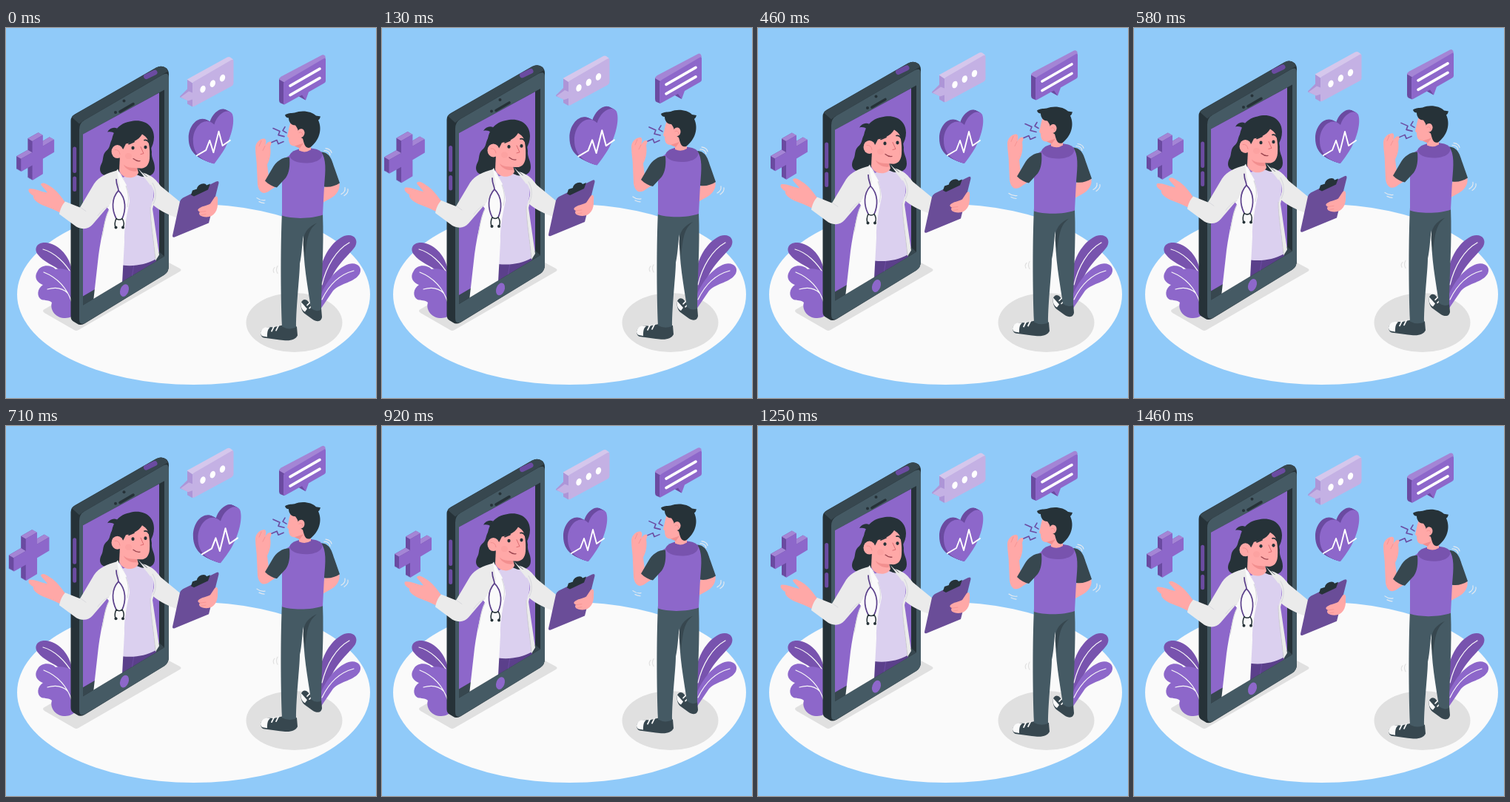
These frames come from a looping animation (500 px wide and 500 px high, 1.5 s). An HTML page with a canvas:

```html
<!DOCTYPE html>
<html lang="en">
<head>
<meta charset="utf-8">
<title>Online doctor</title>
<style>
html, body { margin: 0; width: 100%; height: 100%; overflow: hidden; background: #90caf9; }
canvas { display: block; width: 100vw; height: 100vh; }
</style>
</head>
<body>
<canvas id="stage"></canvas>
<script>
const canvas = document.getElementById('stage');
const ctx = canvas.getContext('2d');
const LOOP = 1500, STEPS = 36, LEAD = 30;
const C = {
  sky: '#90caf9', floor: '#fafafa', shade: '#e0e0e0', white: '#fafafa',
  sleeve: '#ebebeb', fold: '#d9d9de',
  ink: '#263238', slate: '#37474f', steel: '#455a64', skin: '#ffa8a7', blush: '#f28f8f',
  light: '#a485d5', purple: '#8d67ca', leaf: '#7853ae', deep: '#6b4ba1', dark: '#5b408b',
  board: '#6a4d98', lilac: '#dbd0ef'
};

const paths = new Map();
function path(d) {
  if (!paths.has(d)) paths.set(d, new Path2D(d));
  return paths.get(d);
}
function fill(color, d) {
  ctx.fillStyle = color;
  ctx.fill(path(d));
}
function line(color, width, d) {
  ctx.strokeStyle = color;
  ctx.lineWidth = width;
  ctx.stroke(path(d));
}
function oval(color, x, y, rx, ry = rx, turn = 0) {
  ctx.fillStyle = color;
  ctx.beginPath();
  ctx.ellipse(x, y, rx, ry, turn, 0, Math.PI * 2);
  ctx.fill();
}
function extrude(dx, dy, front, tops = '') {
  for (let i = 8; i > 0; i--) {
    ctx.save();
    ctx.translate(dx * i / 8, dy * i / 8);
    fill(C.deep, front);
    ctx.restore();
  }
  fill(C.light, tops);
  fill(C.purple, front);
}
function within(d, draw) {
  ctx.save();
  ctx.clip(path(d));
  draw();
  ctx.restore();
}
function shifted(dy, ...parts) {
  ctx.save();
  ctx.translate(0, dy);
  parts.forEach(part => part());
  ctx.restore();
}

function drawGround() {
  ctx.fillStyle = C.sky;
  ctx.fillRect(0, 0, 500, 500);
  oval(C.floor, 253.5, 360, 238.5, 122);
  oval(C.shade, 389.5, 398, 65, 40);
  fill(C.shade, 'M52 380L190 301L235 325Q238 327 235 329L98 408Q95 410 92 408L52 385Q48 382 52 380Z');
}

function drawPlants() {
  fill(C.leaf, 'M89 326C84 305 70 292 54 290C42 289 37 298 43 306C51 317 65 320 76 330C82 336 86 342 89 350Z');
  line(C.white, 1.2, 'M50 299C65 303 80 317 89 333');
  fill(C.purple, 'M90 330C82 326 73 324 67 326C60 319 47 320 43 328C37 337 42 344 50 347C42 352 41 363 48 367C53 369 58 367 62 371C59 380 66 391 78 392C84 392 89 391 94 386Z');
  line(C.white, 1.2, 'M51 330C66 336 81 347 89 371M56 353C66 350 76 351 83 358');
  fill(C.leaf, 'M426 322C431 303 443 287 457 281C469 277 477 285 472 295C464 307 447 318 437 344L426 364Z');
  line(C.white, 1.2, 'M427 347C433 322 446 300 464 290');
  fill(C.purple, 'M425 362C431 346 445 325 463 319C475 316 482 324 478 332C471 344 453 344 442 355L425 380Z');
  line(C.white, 1.2, 'M427 367C437 346 451 333 470 328');
}

function drawPhone() {
  fill(C.ink, 'M87.5 126Q87.5 120 93 117L203 54Q211 50 217 55Q220 58 220 63L220 322Q220 330 214 334L106 400Q100 403 96 400L91 397Q87.5 395 87.5 390Z');
  fill(C.slate, 'M89 121Q90 119 94 117L203 54Q210 50 217 55L219 59L104 126L99 130Z');
  fill(C.steel, 'M99 138Q99 129 106 125L211 64Q220 59 220 68L220 322Q220 330 214 334L107 399Q99 403 99 394Z');
  line(C.deep, 7, 'M189.5 66L201 60.5');
  line(C.deep, 5, 'M92.7 163.5V194M92.7 203.5V219');
  line(C.ink, 3.6, 'M154 113.5L172 103');
  oval(C.ink, 159.5, 99, 2);
  oval(C.ink, 148, 114.5, 2);
  fill(C.ink, 'M104 144L214 84V309L104 375Z');
  fill(C.slate, 'M104 363L207 303L214 309L104 375Z');
  fill(C.purple, 'M104 144L207 88V303L104 363Z');
  oval(C.purple, 160, 355, 5.6, 8.7, .35);
}

function drawTorso() {
  fill(C.dark, 'M156 315L203 306V325L156 346Z');
  line(C.deep, 1, 'M173 320L170 338');
  fill(C.lilac, 'M156 203L180 195L198 207C203 221 196 240 196 258L202 313C189 320 174 323 157 321Z');
  fill(C.white, 'M150 191L135 199L120 222L139 246C134 258 129 280 125 308L118 370L157 345L160 290C159 270 164 250 167 235C166 220 161 209 156 199Z');
  line(C.fold, 1.1, 'M139 247C133 258 133 269 130 282M155 199C163 214 168 226 164 242');
  fill(C.sleeve, 'M178 194L199 203L204 221L198 245L207 307L202 315C200 290 195 260 195 245C200 230 204 222 194 210Z');
  line('#c9c9cf', .8, 'M195 243C195 264 200 290 202 313');
}

function drawArms() {
  fill(C.skin, 'M81 237C74 228 68 219 59 214C54 210 48 208 47 212C49 216 54 219 56 223C46 221 36 216 31 218C29 221 33 225 37 227C36 230 39 234 44 237C50 241 62 244 73 250Z');
  fill(C.sleeve, 'M150 193C136 197 126 201 119 211L100 243L80 235C76 239 73 246 72 252L95 269C103 273 111 273 117 266L141 238L154 215Z');
  line(C.fold, 1, 'M139 241C134 243 129 247 124 254M101 243L108 248');
  fill(C.sleeve, 'M185 196C198 200 203 206 209 214L237 237L231 257C219 253 205 246 197 238C202 228 203 216 196 206Z');
  line(C.fold, 1.2, 'M199 238C204 229 203 218 198 210');
}

function drawClipboard() {
  fill(C.board, 'M225 281L235 235Q236 232 239 230L284 208Q288 206 287.5 210L274 264L228 283Q224.5 284 225 281Z');
  fill(C.ink, 'M250 226L252 220L258 218C258 212 269 208 271 213L276 211L273 219L254 228Z');
  fill(C.skin, 'M260 245C264 241 271 241 276 238L282 229C285 226 287 229 286 235C287 247 281 256 271 256C263 256 259 252 262 249C259 248 259 246 260 245Z');
  line(C.blush, .7, 'M262 249L270 248M264 253L270 252');
}

function drawStethoscope() {
  line(C.dark, 1.7, 'M149 205C149 213 152 216 152 220C142 231 143 246 149 258M152 220C163 231 162 247 157 258');
  line(C.ink, 1.5, 'M149 258Q153 261 157 258M149 258Q146 264 148 270M157 258Q161 264 158 270');
  oval(C.ink, 148.5, 270, 2);
  oval(C.ink, 158, 270, 2);
}

function drawDoctorHead() {
  fill(C.ink, 'M145 148C139 156 142 162 135 167C130 172 132 179 129 184C123 196 132 202 140 199C146 201 152 198 155 191L180 200C188 204 201 201 201 190C201 180 196 177 197 168L193 140L160 134Z');
  fill(C.skin, 'M154 173L153 193C157 206 176 205 179 196L176 185Z');
  fill(C.blush, 'M159 185C164 190 171 190 177 188L177 194C169 195 161 191 159 185Z');
  fill(C.skin, 'M155 150L185 141C193 147 195 163 194 177C193 187 188 191 180 190C168 190 158 186 155 177Z');
  fill(C.ink, 'M144 162C140 147 149 130 167 127C186 122 200 132 200 148C200 154 198 160 195 165C195 155 191 148 184 144C179 153 168 156 162 157C160 161 158 165 156 168Z');
  fill(C.ink, 'M150 136C145 134 140 136 137 141C142 140 145 141 148 144Z');
  oval(C.skin, 150.5, 167.5, 8, 9);
  line(C.blush, 1, 'M147 165Q153 164 154 171');
  ctx.globalAlpha = .25;
  oval(C.blush, 165.5, 173.5, 4.5, 4);
  ctx.globalAlpha = 1;
  oval(C.ink, 171.5, 162.5, 2.1, 2.4);
  oval(C.ink, 188.5, 161.5, 2.1, 2.4);
  line(C.ink, 1.7, 'M166 157L173 154M187 152Q191 151 193 155');
  line('#dc6b70', 1, 'M182 161L186 170L182 171');
  line('#9b454f', 1.3, 'M172 177Q177 181 181 180');
}

function drawDoctor() {
  within('M0 0H300V257.4L104 375H0Z', drawTorso);
  drawDoctorHead();
  fill(C.white, 'M151 191L146 198L157 217L163 213L154 198Z');
  fill(C.sleeve, 'M178 190L183 195L198 208L195 213Z');
  drawArms();
  drawStethoscope();
  drawClipboard();
}

function drawBubbles() {
  fill('#ad95d7', 'M245 70L252 74V107L245 103V98L235 94Q235 92 237 91L245 83Z');
  fill('#d5c7ec', 'M244.5 70L299 40Q301 39 303 40L307 43L252 75Z');
  fill('#c4b1e4', 'M252 76Q252 74 254 73L304 44Q307.5 42 307.5 45V75Q307.5 77 305 79L255 106Q252 108 252 105Z');
  fill('#c4b1e4', 'M236 94L247 86L252 88V97L246 99Z');
  [[266, 83], [279.3, 75.5], [292.5, 68]].forEach(([x, y]) => oval('#fff', x, y, 3.5, 5, .35));

  fill(C.deep, 'M369 69L376 73V104L371 102Q369 101 369 98Z');
  fill(C.light, 'M369 70Q369 68 372 66L427 37Q429 36 431 38L432 41L376 74Z');
  fill(C.purple, 'M375 76Q375 74 378 72L429 42Q432 40 432 43V72Q432 74 430 75L409 87L405 98L396 93L378 103Q375 105 375 102Z');
  fill(C.deep, 'M396 93L400 91L405 98Z');
  line('#fff', 3.6, 'M384 78.5L424 55.5M384 91L424 68');
}

function drawSymbols() {
  extrude(-6, -3.5,
    'M38 153L52 145V159.7L67 151V167.5L52 176.5V196.5L38 205V185L23 193.5V176.5L38 168Z',
    'M38 153L52 145L46 141.5L32 149.5ZM52 159.7L67 151L61 147.5L46 156.2ZM23 176.5L38 168L32 164.5L17 173Z');
  extrude(-6, -3,
    'M279 183C268 180 251 174 251 152C251 133 267 119 279 131C283 117 297 108 303 117C307 128 301 148 294 161C289 170 283 178 279 183Z');
  line('#fff', 1.9, 'M256 172L268 165L273 152L278 168L285 140L290 159L300 152');
}

function drawLegs() {
  fill(C.slate, 'M399 371C403 364 408 368 413 376L426 379L427 391C426 398 420 398 414 394L403 386C399 382 398 377 399 371Z');
  fill(C.white, 'M399 371C398 378 400 382 404 384L407 380Z');
  line(C.white, 1.6, 'M407 375L411 371M410 379L414 375');
  fill(C.slate, 'M344 412C346 405 354 404 361 405L374 402L393 404L394 416C391 422 384 424 370 422L348 419C345 418 344 415 344 412Z');
  fill(C.white, 'M344 412C346 405 351 404 357 405C353 408 353 413 353 418L347 417Q344 416 344 412Z');
  line(C.white, 1.8, 'M362 404L359 410M368 403L365 409');
  fill(C.steel, 'M373 250C371 290 371 360 373 404Q382 409 392 405C392 375 397 335 397 319C400 306 400 290 402 281C401 318 408 350 412 379Q419 385 426 381C426 340 430 300 428 250Z');
  fill(C.slate, 'M402 297C401 282 403 272 420 264C409 273 407 282 404 311Z');
}

function drawMan() {
  drawLegs();
  fill(C.skin, 'M432 212L450 209C453 218 446 227 438 231L427 237L428 222Z');
  fill(C.slate, 'M426 168C438 169 440 178 444 190L451 210C445 214 438 216 430 215Z');
  fill(C.skin, 'M355 202L353 185C358 176 358 166 357 161L359 155C356 152 352 156 350 160C352 155 352 149 348 150C341 151 337 157 337 163C337 172 339 180 339 190L340 212C342 225 350 226 358 219L366 214Z');
  line(C.blush, .8, 'M350 160L347 166M345 153L342 160');
  fill(C.purple, 'M386 171C377 175 373 182 373 192V254C387 259 415 258 428 253L430 214C432 192 433 178 426 168Z');
  fill(C.slate, 'M383 175C373 175 365 181 360 190L350 207C355 212 361 215 366 216L378 203C383 196 384 186 383 175Z');
  fill(C.leaf, 'M383 173C386 161 420 159 427 169C429 177 420 183 405 183C393 183 384 179 383 173Z');
  fill(C.skin, 'M386 125C382 134 382 140 380 147L382 149C382 156 384 160 390 160L396 160L396 166Q404 170 412 165L412 142L398 126Z');
  fill(C.blush, 'M390 160L402 156L397 163Z');
  fill(C.ink, 'M377 118C382 115 384 116 390 115C400 111 413 113 419 119L425 120Q424 124 422 125C428 138 423 153 411 162C404 164 403 157 401 150L395 146C396 140 394 136 391 132C385 132 382 127 382 122Q378 122 377 118Z');
  oval(C.skin, 398.5, 142.5, 5, 6, .2);
  line(C.blush, .9, 'M396 142Q400 139 401 145');
  line(C.deep, 1.6, 'M361 136L370 140L368 145L376 147M359 155L366 152L368 157L375 154M377 134L374 139L379 142');
  line('#e4e9ef', 1.2, 'M339 230Q344 234 350 233M342 235Q346 237 349 237M453 225Q459 222 458 216M457 227Q463 223 462 218M430 166Q437 166 438 172M432 163Q439 164 440 169');
  line(C.shade, 1.2, 'M367 322Q364 327 367 332M363 324Q360 327 362 331');
}

function ramp(t, from, to) {
  return Math.min(1, Math.max(0, (t - from) / (to - from)));
}

// Two beats per loop, peaking at 10% and 50%.
function beat(p) {
  const first = ramp(p, 0, .1) - ramp(p, .1, .3);
  const second = ramp(p, .4, .5) - ramp(p, .5, .6);
  return 1 + .1 * (first + second);
}

function drawScene(time) {
  const step = Math.floor((time % LOOP) / LOOP * STEPS);
  const p = (step / STEPS + LEAD / LOOP) % 1;
  const lift = -10 * (1 - Math.abs(2 * p - 1));
  const size = beat(p);

  drawGround();
  drawPlants();
  shifted(lift, drawPhone, drawDoctor, drawBubbles, drawMan);

  ctx.save();
  ctx.translate(160, 158);
  ctx.scale(size, size);
  ctx.translate(-160, -158);
  drawSymbols();
  ctx.restore();
}

let start;
function frame(now) {
  start ??= now;
  const ratio = devicePixelRatio || 1;
  const width = Math.round(innerWidth * ratio), height = Math.round(innerHeight * ratio);
  if (canvas.width !== width || canvas.height !== height) {
    canvas.width = width;
    canvas.height = height;
  }
  ctx.setTransform(width / 500, 0, 0, height / 500, 0, 0);
  ctx.lineCap = ctx.lineJoin = 'round';
  drawScene(now - start);
  requestAnimationFrame(frame);
}
requestAnimationFrame(frame);
</script>
</body>
</html>
```
